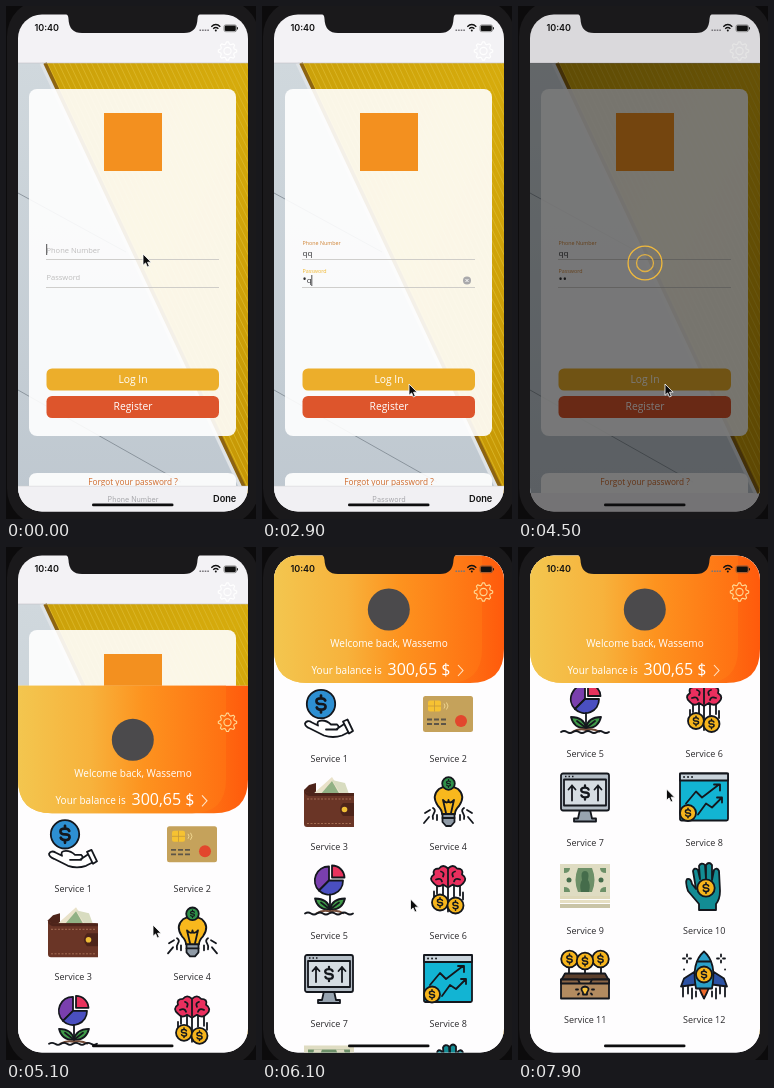
Animation of 250 by 513 pixels, one loop 8 s. Source, as an HTML page:

```html
<!DOCTYPE html>
<html lang="en">
<head>
<meta charset="utf-8">
<title>Wallet login</title>
<style>
html, body { margin: 0; width: 100%; height: 100%; overflow: hidden; background: #0c0b0c; }
svg { display: block; width: 250px; height: 513px; }
text { font-family: "Open Sans", "Noto Sans", sans-serif; }
.ui { font-family: Inter, Roboto, sans-serif; }
.mid { text-anchor: middle; }
.ink { stroke: #14171d; stroke-width: 1.8; stroke-linejoin: round; stroke-linecap: round; }
.line { fill: none; }
.sign { fill: none; stroke: #14171d; stroke-width: .19; stroke-linecap: round; }
</style>
</head>
<body>
<svg id="stage" viewBox="0 0 250 513">
  <defs>
    <clipPath id="screen"><rect x="12" y="8.500" width="230" height="497" rx="24"/></clipPath>
    <clipPath id="listClip"><rect x="12" y="141" width="230" height="365"/></clipPath>
    <clipPath id="metal"><path d="M38 57H242V490Z"/></clipPath>
    <linearGradient id="wall" x2="0" y2="1"><stop stop-color="#d0d8dd"/><stop offset="1" stop-color="#bfc8d0"/></linearGradient>
    <linearGradient id="gold" x2="1" y2="1"><stop stop-color="#c99f0a"/><stop offset=".5" stop-color="#d6ab0c"/><stop offset="1" stop-color="#c59605"/></linearGradient>
    <linearGradient id="back"><stop stop-color="#f3c44e"/><stop offset=".55" stop-color="#fd961f"/><stop offset="1" stop-color="#ff5a0c"/></linearGradient>
    <linearGradient id="front"><stop stop-color="#f3c64f"/><stop offset=".35" stop-color="#f7b23c"/><stop offset=".6" stop-color="#fd931f"/><stop offset="1" stop-color="#ff7012"/></linearGradient>
    <g id="gear" fill="none" stroke-width="1.100" stroke-linejoin="round">
      <path id="teeth"/><circle cx="221.500" cy="45" r="3.600"/>
    </g>
  </defs>
  <rect x="1" y="-6" width="252" height="525" rx="36" fill="#1a191b"/>
  <g clip-path="url(#screen)">
    <rect x="12" y="8" width="230" height="498" fill="#f3f2f5"/>
    <g id="login">
      <rect x="12" y="57" width="230" height="430" fill="url(#wall)"/>
      <path d="M12 187L120 246M12 384L175 476" stroke="#7d8790" stroke-width=".8"/>
      <g clip-path="url(#metal)">
        <rect x="12" y="57" width="230" height="434" fill="url(#gold)"/>
        <g id="ribs" stroke="#dcb92c" stroke-width=".8"></g>
      </g>
      <path d="M35.500 57L237.500 487" stroke="#dfe3e6" stroke-width="4"/>
      <path d="M39 57L241 487" stroke="#8d6412" stroke-width="3.600"/>
      <rect x="23" y="83" width="207" height="347" rx="8" fill="#fff" opacity=".9"/>
      <path d="M23 495V475Q23 467 31 467H222Q230 467 230 475V487H23Z" fill="#fff" opacity=".9"/>
      <rect x="98" y="107" width="58" height="58" fill="#f3901f"/>
      <path d="M40 253.500H213M40 281.500H213" stroke="#c4c3c1" stroke-width=".8"/>
      <g id="fields"></g>
      <path id="caret" stroke="#3a3a3c" stroke-width=".9"/>
      <g id="clear">
        <circle cx="205" r="4" fill="#a9a9ab"/>
        <path d="M203.500 -1.500l3 3m0 -3l-3 3" stroke="#fff" stroke-width=".9"/>
      </g>
      <rect x="40.500" y="362.500" width="172.500" height="22" rx="5.500" fill="#ecae2b"/>
      <rect x="40.500" y="390" width="172.500" height="22" rx="5.500" fill="#dd552c"/>
      <g class="mid" fill="#fff" font-size="10.300">
        <text x="127" y="376.500">Log In</text>
        <text x="127" y="404">Register</text>
      </g>
      <text class="mid" x="127" y="479" font-size="8.260" fill="#cf6a2c">Forgot your password ?</text>
    </g>
    <g id="bar">
      <rect x="12" y="480" width="230" height="34" fill="#f1f0f3"/>
      <path d="M12 480.200H242" stroke="#cfced2" stroke-width=".5"/>
      <text id="barLabel" class="ui mid" x="127" y="495.500" font-size="7.200" fill="#a9a9ad"></text>
      <text class="ui" x="207" y="496" font-size="9.200" font-weight="600" fill="#111">Done</text>
    </g>
    <path d="M12 57H242" stroke="#c4c2c6" stroke-width=".6"/>
    <use href="#gear" stroke="#fff"/>
    <g id="dim">
      <rect x="12" y="57" width="230" height="449" opacity=".52"/>
      <rect x="12" y="8" width="230" height="49" opacity=".1"/>
      <g fill="none" stroke="#f0b93c" stroke-width="1.300">
        <circle class="ring" cx="127" cy="257"/>
        <circle class="ring" cx="127" cy="257"/>
      </g>
    </g>
    <g id="home">
      <rect x="12" y="8.500" width="230" height="500" fill="#fefdfe"/>
      <g clip-path="url(#listClip)"><g id="list"></g></g>
      <path d="M12 8.500H242V102Q242 136 208 136H46Q12 136 12 102Z" fill="url(#back)"/>
      <path d="M12 8.500H220V102Q220 136 186 136H46Q12 136 12 102Z" fill="url(#front)"/>
      <circle cx="126.800" cy="62.500" r="21" fill="#4b4a4c"/>
      <g fill="#fff">
        <text class="mid" x="127" y="99.500" font-size="10">Welcome back, Wassemo</text>
        <text x="49.500" y="127" font-size="10">Your balance is</text>
        <text x="125.500" y="128" font-size="16">300,65 $</text>
      </g>
      <path d="M196 118l5 5.500l-5 5.500" fill="none" stroke="#ffe3c4" stroke-width="1.100"/>
      <use href="#gear" stroke="#ffd994"/>
    </g>
    <g id="status" fill="#111">
      <text class="ui" x="28.500" y="25.300" font-size="9" font-weight="600">10:40</text>
      <path d="M193.500 24.200H203" stroke="#77757a" stroke-width="1.600" stroke-dasharray="1.600 1"/>
      <path d="M205.300 20.700Q209.800 16.500 214.300 20.700M207.200 22.800Q209.800 20.400 212.400 22.800" fill="none" stroke="#111" stroke-width="1.400"/>
      <circle cx="209.800" cy="24.600" r="1"/>
      <rect x="218" y="18.900" width="12.500" height="6.800" rx="1.800" fill="none" stroke="#555" stroke-width=".6"/>
      <rect x="218.700" y="19.600" width="11.100" height="5.400" rx="1.200"/>
      <rect x="231.100" y="21.200" width=".9" height="2.200"/>
    </g>
    <rect x="86" y="497.600" width="81.500" height="2.700" rx="1.350" fill="#0d0d0e"/>
  </g>
  <path d="M58 7Q62.500 8 62.500 13Q63 27 76 27H178Q191 27 191.500 13Q191.500 8 196 7Z" fill="#1a191b"/>
  <path id="cursor" d="M0 0V11.300L2.600 8.900L4.400 13L6.300 12.200L4.600 8.200H8.100Z" fill="#0b0b0c" stroke="#fff" stroke-width=".8"/>
</svg>
<script>
const $ = id => document.getElementById(id);
const LOOP = 8000;

// ---- icon pieces, each icon lives in a 50 x 50 box ----
const shape = (d, fill) => `<path class="ink" d="${d}" fill="${fill}"/>`;
const flat = (d, fill) => `<path d="${d}" fill="${fill}"/>`;
const ink = d => `<path class="ink line" d="${d}"/>`;
const dollar = (x, y, r) =>
  `<path class="sign" transform="translate(${x} ${y}) scale(${r})"
    d="M.3 -.24Q.24 -.4 0 -.4Q-.32 -.4 -.32 -.2Q-.32 0 0 0Q.32 0 .32 .2Q.32 .4 0 .4Q-.24 .4 -.3 .24M0 -.6V-.4M0 .4V.6"/>`;
const coin = (x, y, r, fill = '#f7b51c') =>
  `<circle class="ink" cx="${x}" cy="${y}" r="${r}" fill="${fill}"/>` + dollar(x, y, r);
const spark = (x, y) => ink(`M${x} ${y - 4}v2M${x} ${y + 2}v2M${x - 4} ${y}h2M${x + 2} ${y}h2`);

const icons = [
  // coin over an open hand
  coin(17, 15.5, 14.2, '#2d8fd2') +
  shape('M1 35Q3 31 8 34L14 37Q12 32 18 32Q23 32 27 36H33Q36 38 33 41H22H32L41 35L46 43L38 47Q29 50 20 47L6 40Q1 38 1 35Z', '#fff') +
  shape('M39 33L43.500 31L49 42.500L45 45Z', '#fff'),
  // bank card
  '<rect y="7.500" width="50" height="36" rx="2.500" fill="#c5a25b"/><rect x="5" y="12" width="13" height="11" rx="2" fill="#f6c232"/>' +
  '<path d="M5 17.500H18M11.500 12V23" stroke="#c5973a" stroke-width=".8"/>' +
  '<path d="M21 15q2 2.500 0 5M23.500 14q3 3.500 0 7" fill="none" stroke="#efd58f"/>' +
  '<path d="M4 31H25M4 35.500H25" stroke="#5d5548" stroke-width="1.800" stroke-dasharray="5 2"/>' +
  '<circle cx="38" cy="32.500" r="6" fill="#e2472d"/>',
  // wallet
  flat('M0 13L5 8L12 6V18H0Z', '#4d241a') +
  flat('M8 18L28 0L39 17Z', '#e9e2c9') + flat('M16 18L28 4L36 18Z', '#91b184') +
  flat('M28 3L41 6L45 17H37Z', '#d8dcc0') +
  flat('M0 12Q1 16 6 16H47Q50 16 50 19V50H3Q0 50 0 47Z', '#6a3526') +
  flat('M0 13Q1 16 6 16H50V19H5Q0 18 0 13Z', '#4d241a') +
  '<path d="M3 22H47M3 46.500H47" stroke="#b07c5e" stroke-width=".8" stroke-dasharray="2 1.500"/>' +
  flat('M50 26H39Q33 32 39 39H50Z', '#4d241a') + '<circle cx="40.500" cy="32.500" r="2.800" fill="#efbd35"/>',
  // bulb with a coin
  shape('M19 37Q19 33 15 29Q8 19 16 12Q25 6 35 12Q43 19 36 29Q32 33 32 37Z', '#f9b81d') +
  ink('M23 36L20 23q5 5 5.500 0q.5 5 5.500 0L28 36') + shape('M19.500 37H31.500V45L28 49H23L19.500 45Z', '#8f9aa6') +
  ink('M19.500 41H31.500M10 31q3 2 1 5t-1 6M41 31q-3 2 -1 5t1 6M7 33l-5 3M44 33l5 3M6 40l-5 6M45 40l5 6M14 38v5M37 38v5') +
  coin(25.5, 6.5, 6.3, '#2f9149'),
  // pie flower
  shape('M25 15V1A14 14 0 0 0 15 25Z', '#7a3fae') + shape('M25 15L15 25A14 14 0 0 0 39 15Z', '#4a4fc0') +
  shape('M28 12V0A12.500 12.500 0 0 1 40.500 12Z', '#e8335d') + ink('M26 29V46') +
  shape('M26 44Q24 33 11 33Q14 45 26 44ZM26 44Q28 33 41 33Q38 45 26 44Z', '#3f9a48') + ink('M17 37L26 44L35 37') +
  '<path d="M12 48q7 -4 14 -2q7 -2 14 2" fill="none" stroke="#754c38" stroke-width="2"/>' +
  ink('M1 48q3 -2 6 0t6 0t6 0t6 0t6 0t6 0t6 0t6 0'),
  // brain and coins
  ink('M14 20V28M20 20V32M25 20V46M31 20V31M37 20V30M11 26V36M40 27V34') +
  shape('M25 3Q20 -2 16 3Q9 3 11 9Q5 13 11 18Q15 23 20 19L25 22L30 19Q36 23 40 18Q45 13 39 9Q41 3 34 3Q30 -2 25 3Z', '#ea2f5e') +
  ink('M25 4V20M18 6q4 1 2 5M13 14q5 -2 6 2M32 6q-4 1 -2 5M37 14q-5 -2 -6 2') +
  coin(17, 37, 8) + coin(32.5, 40, 8),
  // monitor
  shape('M20 37H30L32 46H36V49H14V46H18Z', '#98a4b0') +
  '<rect class="ink" x="1" y="1" width="48" height="37" rx="2" fill="#b4bdc6"/>' +
  '<rect class="ink" x="4" y="7" width="42" height="26" fill="#d5dce2"/>' +
  '<path d="M5 4H14" stroke="#14171d" stroke-width="1.500" stroke-dasharray="1.500 2"/>' +
  ink('M12 28V13M8.500 17L12 13L15.500 17M38 28V13M34.500 17L38 13L41.500 17') + dollar(25, 20, 12),
  // chart window
  '<rect class="ink" x="1" y="1" width="48" height="47" rx="1.500" fill="#12b4d3"/>' + shape('M1 1H49V8H1Z', '#c9d3db') +
  ink('M5 4.500h.1M9 4.500h.1M13 4.500h.1M7 31L17 19L23 25L40 12M35 12H41V18M19 42L27 31L33 35L43 25M38 25H43V30') + coin(9, 40.5, 8),
  // banknotes
  flat('M0 35H50V38H0Z', '#ded8b9') + flat('M0 39H50V42H0Z', '#e6dfc3') + flat('M0 43H50V47H0Z', '#c9c4a6') +
  flat('M0 3H50V35H0Z', '#dfdcc2') + flat('M4 7H46V31H4Z', '#6d9068') +
  flat('M4 12Q10 12 10 7H18Q13 19 18 31H10Q10 26 4 26ZM46 12Q40 12 40 7H32Q37 19 32 31H40Q40 26 46 26Z', '#dfdcc2') +
  flat('M21 31Q19 23 22 19Q20 10 25 10Q30 10 28 19Q31 23 29 31Z', '#456c4b') +
  '<circle cx="9" cy="19" r="2.500" fill="#456c4b"/><circle cx="41" cy="19" r="2.500" fill="#456c4b"/>',
  // hand holding a coin
  shape('M20 49V43L9 30Q6 21 8 18Q12 17 13 23L17 28L14 10Q15 6 19 9L21 18L20 5Q22 1 26 4L27 18V4Q30 0 33 4V19L35 9Q38 6 40 10L41 30Q41 38 37 43V49Z', '#138c94') +
  coin(27, 27, 8.7),
  // box of ideas
  ink('M9 17V27M25 19V27M41 17V27') + shape('M5 24H45L49 31H1Z', '#5b3f2c') + shape('M1 30H49V49H1Z', '#b28b60') +
  shape('M1 30H18L20 34H30L32 30H49V34H1Z', '#8a6546') + coin(9.5, 9.5, 8.3) + coin(40.5, 9.5, 8.3) + coin(25, 11.5, 8.3) +
  shape('M23 45V43Q19 38 25 37Q31 38 27 43V45Z', '#f8c239') + ink('M16 40h2M32 40h2M18 45l1 -1M32 45l-1 -1'),
  // rocket
  ink('M4 38V47M9 37V44M13 39V49M37 39V49M41 37V44M46 38V47M17 42V47M33 42V47') +
  shape('M16 22L5 29L2 37L17 35ZM34 22L45 29L48 37L33 35Z', '#2c52a3') +
  shape('M20 38H30L28 43L25 49L22 43Z', '#ee6a2b') +
  shape('M25 2Q12 13 17 39H33Q38 13 25 2Z', '#2ba0c9') + ink('M19 12H31') + coin(25, 25, 8) +
  spark(8, 9) + spark(42, 9) + ink('M5 20h.1M46 20h.1')
];

$('list').innerHTML = icons.map((art, i) => {
  const x = i % 2 ? 161 : 42, y = 141.5 + 88.5 * (i >> 1);
  return `<g transform="translate(${x} ${y})">${art}
    <text class="mid" x="25.200" y="73" font-size="9" fill="#29282b">Service ${i + 1}</text></g>`;
}).join('');

$('ribs').innerHTML = Array.from({ length: 40 }, (_, i) =>
  `<path d="M${36 + i * 5.5} 57l205 434"/>`).join('');

$('teeth').setAttribute('d', 'M' + Array.from({ length: 32 }, (_, i) => {
  const a = (i - .5) * Math.PI / 16, r = i % 4 < 2 ? 9.2 : 7;
  return `${221.5 + r * Math.cos(a)} ${45 + r * Math.sin(a)}`;
}).join('L') + 'Z');

const fields = [
  { name: 'Phone Number', y: 246.5, typed: [700, 1000], from: 0, to: 1600 },
  { name: 'Password', y: 274, typed: [2300, 2700], from: 1600, to: 3300, secret: 3100 }
];
$('fields').innerHTML = fields.map(f =>
  `<text x="40.500">${f.name}</text><text x="40.500" y="${f.y + 3.4}" font-size="8" fill="#303033"></text>`).join('');
fields.forEach((f, i) => [f.label, f.value] = [...$('fields').children].slice(i * 2, i * 2 + 2));

// ---- motion ----
const clamp = v => Math.max(0, Math.min(1, v));
const mix = (a, b, p) => a + (b - a) * p;
const smooth = p => p * p * (3 - 2 * p);
const ramp = (t, a, b) => clamp((t - a) / (b - a));

function track(t, keys) {
  const i = keys.findIndex(k => k[0] > t);
  if (i === 0) return keys[0][1];
  if (i < 0) return keys[keys.length - 1][1];
  const [a, va] = keys[i - 1], [b, vb] = keys[i];
  return mix(va, vb, smooth((t - a) / (b - a)));
}

const cursorX = [[0, 137], [1100, 137], [1500, 140], [1900, 140], [2750, 147], [5300, 147], [6000, 148.5], [6300, 148.5], [7100, 152], [7900, 148.5]];
const cursorY = [[0, 248], [1100, 248], [1500, 270], [1900, 270], [2750, 378], [5300, 378], [6000, 352], [6200, 352], [6700, 252], [7100, 260], [7900, 242]];
const scrollY = [[6150, 0], [6850, 180], [7100, 183.5], [7900, 181.5]];

const move = (id, x, y) => $(id).setAttribute('transform', `translate(${x} ${y})`);
const show = (id, on) => $(id).setAttribute('visibility', on ? 'visible' : 'hidden');

function drawField(f, t) {
  const count = f.typed.filter(k => t >= k).length;
  const focused = t >= f.from && t < f.to;
  const p = smooth(ramp(t, f.typed[0], f.typed[0] + 150));
  f.label.setAttribute('font-size', mix(7.5, 5.35, p));
  f.label.setAttribute('y', f.y - 7.3 * p);
  f.label.setAttribute('fill', p < .5 ? '#bdbcbc' : focused ? '#f0b62c' : '#d08435');
  const dots = !f.secret ? 0 : t >= f.secret ? count : Math.max(0, count - 1);
  f.value.innerHTML = `<tspan font-size="11">${'•'.repeat(dots)}</tspan>${'q'.repeat(count - dots)}`;
  if (!focused) return false;
  const x = 40.7 + dots * 4.2 + (count - dots) * 4.9;
  $('caret').setAttribute('d', `M${x} ${f.y - 8.5 + 3.5 * p}v11`);
  move('clear', 0, f.y + .5);
  show('clear', count > 0);
  $('barLabel').textContent = f.name;
  return true;
}

function render(t) {
  const focused = fields.map(f => drawField(f, t)).some(Boolean);
  show('caret', focused && (t + 200) % 1000 < 600);
  if (!focused) show('clear', false);
  move('bar', 0, 30 * smooth(ramp(t, 3300, 3550)));

  $('dim').setAttribute('opacity', ramp(t, 3350, 3600) * (1 - ramp(t, 4700, 4850)));
  document.querySelectorAll('.ring').forEach((ring, i) => {
    const p = ((t - 4500) / 1200 + 6.94 - i * .47) % 1;
    ring.setAttribute('r', 18 * p);
    ring.setAttribute('opacity', Math.min(1, .4 + p, (1 - p) * 18));
  });

  move('home', 0, 505 * Math.pow(1 - ramp(t, 4850, 5450), 2.5));
  show('home', t >= 4850);
  move('list', 0, -track(t, scrollY));
  move('cursor', track(t, cursorX), track(t, cursorY));
}

function tick() {
  render(performance.now() % LOOP);
  requestAnimationFrame(tick);
}
tick();
</script>
</body>
</html>
```
